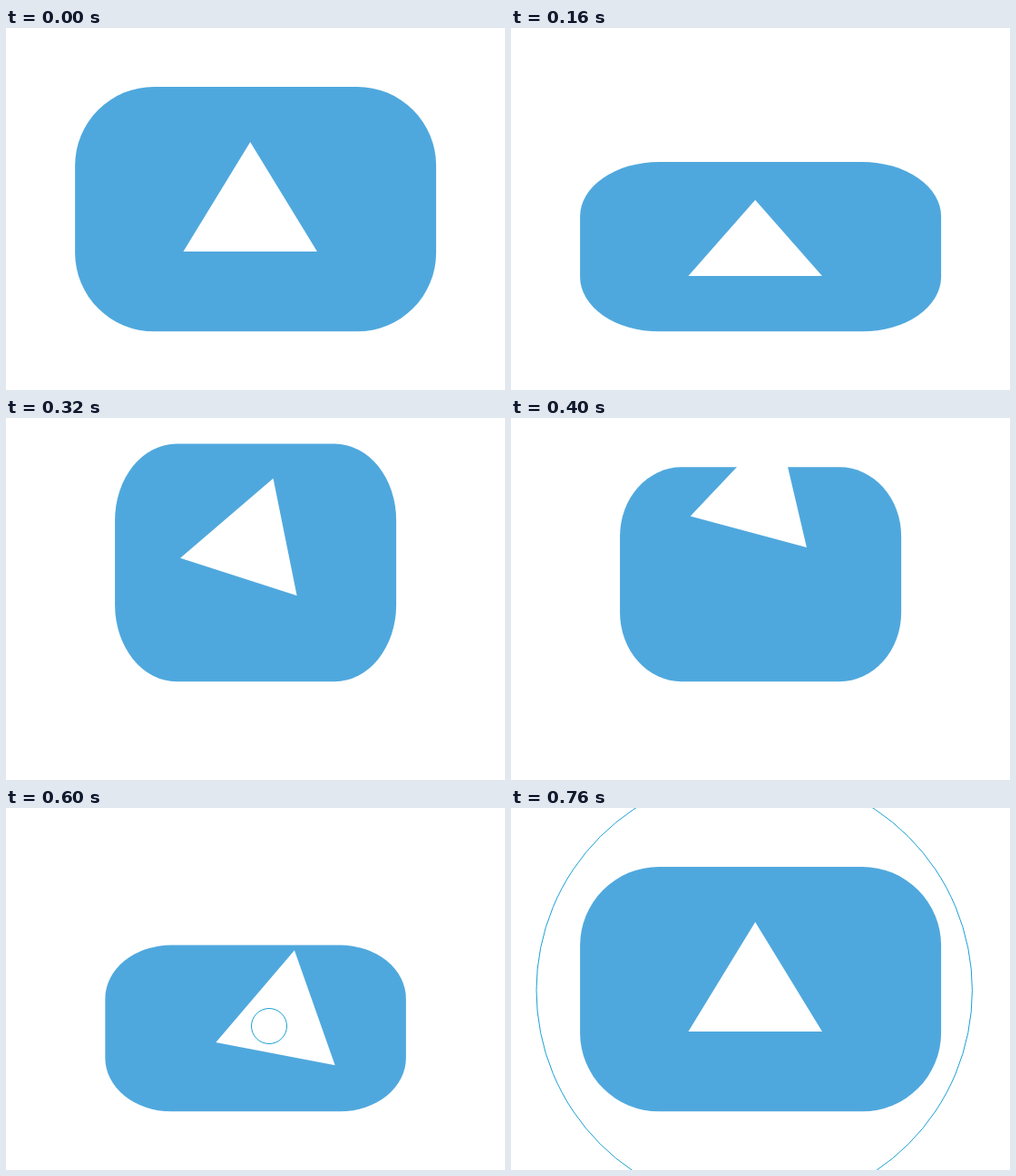
Write an HTML page with a canvas that moves like this. It is 550 px wide and 400 px high and loops after 0.8 s.

```html
<!DOCTYPE html>
<html lang="en">
<head>
<meta charset="utf-8">
<title>Bouncing button</title>
<style>
  html, body { margin: 0; width: 100%; height: 100%; overflow: hidden; background: #fff; }
  canvas { display: block; }
</style>
</head>
<body>
<canvas id="stage" width="550" height="400"></canvas>
<script>
const ctx = document.getElementById('stage').getContext('2d');
const STEP = 40, STEPS = 20;
const FLOOR = 335.3, WIDTH = 398, HEIGHT = 270.3, CORNER = 87;
const CROUCH = 4, STRETCH = 6, TOP = 10, LAND = 13, SQUASH = 15, REST = 19;

const clamp = v => Math.min(1, Math.max(0, v));
const mix = (a, b, k) => a + (b - a) * k;

// Straight moves between [step, value] points, held outside them.
function track(step, ...points) {
  return points.reduce(([s0, v0], [s1, v1]) =>
    [s1, mix(v0, v1, clamp((step - s0) / (s1 - s0)))].map((v, i) => i && step >= s1 ? v1 : v))[1];
}

function drawButton(step) {
  const sx = track(step, [CROUCH, 1], [STRETCH, 0.779], [TOP, 0.779], [LAND, 0.94], [SQUASH, 0.833], [REST, 1]);
  const sy = track(step, [0, 1], [CROUCH, 0.693], [STRETCH, 1.067], [TOP, 0.876], [LAND, 0.71], [SQUASH, 0.68], [REST, 1]);
  const hop = 51 * Math.sin(Math.PI * clamp((step - STRETCH) / 6));
  ctx.save();
  ctx.translate(275.1, FLOOR - hop);
  ctx.scale(sx, sy);
  ctx.fillStyle = '#4fa8dd';
  ctx.beginPath();
  ctx.roundRect(-WIDTH / 2, -HEIGHT, WIDTH, HEIGHT, CORNER);
  ctx.fill();
  ctx.restore();
}

function drawArrow(step) {
  const x = track(step, [CROUCH, 269.2], [STRETCH, 265.7], [TOP, 272.5], [SQUASH, 304], [REST, 269.2]);
  const y = track(step, [0, 206.6], [CROUCH, 246], [TOP, 86], [SQUASH, 233.5], [REST, 206.6]);
  const spin = track(step, [CROUCH, 0], [STRETCH, 142.1], [TOP, 375.1], [LAND, 545.8], [SQUASH, 610.6], [REST, 720]);
  const sx = track(step, [CROUCH, 1], [STRETCH, 0.89], [SQUASH, 0.913], [REST, 1]);
  const sy = track(step, [0, 1], [CROUCH, 0.693], [STRETCH, 0.927], [TOP, 1.02], [SQUASH, 0.955], [REST, 1]);
  ctx.save();
  ctx.translate(x, y);
  ctx.rotate(spin * Math.PI / 180);
  ctx.scale(sx, sy);
  ctx.fillStyle = '#fff';
  ctx.beginPath();
  ctx.moveTo(0, -80.7);
  ctx.lineTo(73.75, 40.3);
  ctx.lineTo(-73.75, 40.3);
  ctx.fill();
  ctx.restore();
}

function drawRing(step) {
  const k = (step - SQUASH) / (REST - SQUASH);
  if (k < 0) return;
  ctx.strokeStyle = '#1b9fd3';
  ctx.beginPath();
  ctx.arc(mix(290, 268.2, k), mix(241, 201.5, k), mix(19.5, 240.2, k), 0, Math.PI * 2);
  ctx.stroke();
}

function render() {
  const step = Math.floor(performance.now() / STEP) % STEPS;
  ctx.clearRect(0, 0, 550, 400);
  drawButton(step);
  drawArrow(step);
  drawRing(step);
  requestAnimationFrame(render);
}
render();
</script>
</body>
</html>
```
